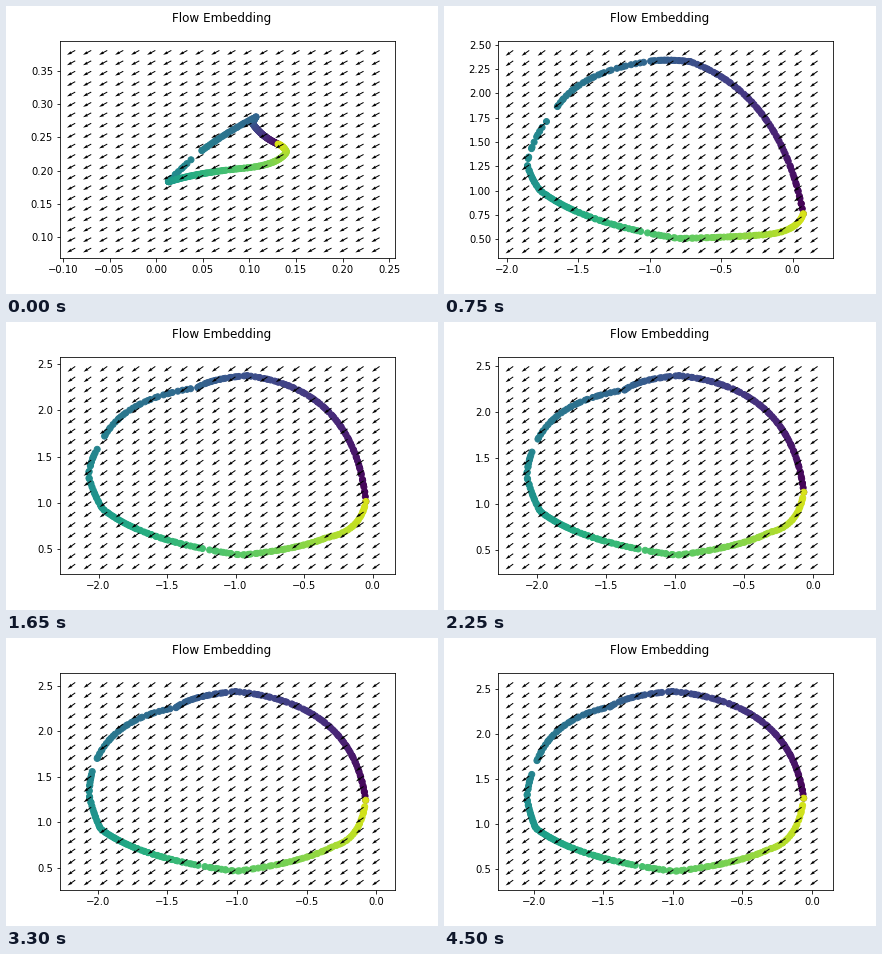
These frames come from a looping animation (432 px wide and 288 px high, 4.65 s). A matplotlib script:

```python
import numpy as np
import matplotlib.pyplot as plt
from matplotlib.animation import FuncAnimation

TICKS, STEP = 31, 150
GRID, PAD = 20, 0.1

# Share of the loop at each landmark: start, top, kink, gap, left, corner,
# bottom, right foot and back to the start
MARKS = np.array([0, .26, .345, .47, .515, .57, .79, .92, 1])
GAPS = [(.325, .333), (.462, .478), (.744, .752)]

# How far each side bends towards the corner of its bounding box
FOLDED = [-.3, 0, -.1, 0, 0, .3, -.6, .4]
OPENING = [.25, .4, -.5, -.3, .4, .3, 0, -.5]
ROUND = [.8, -.5, -.62, -.4, .2, .42, -.35, -.7]

# Training step: bends and landmarks in data units
POSES = {
    0: (FOLDED, [(.1308, .240), (.103, .272), (.1072, .281), (.0428, .2235),
                 (.0131, .1843), (.0138, .1833), (.0965, .204),
                 (.1399, .228)]),
    2: (OPENING, [(.218, .635), (-.538, 2.302), (-.763, 2.448),
                  (-1.288, 1.979), (-1.533, 1.281), (-1.462, 1.062),
                  (-.635, .646), (.115, .59)]),
    6: (ROUND, [(-.018, .844), (-.835, 2.342), (-1.147, 2.253),
                (-1.941, 1.64), (-2.077, 1.274), (-1.964, .952),
                (-.909, .416), (-.36, .522)]),
    18: (ROUND, [(-.085, 1.221), (-1.016, 2.417), (-1.433, 2.238),
                 (-2.047, 1.593), (-2.071, 1.32), (-1.978, .915),
                 (-1.016, .457), (-.298, .751)]),
    29: (ROUND, [(-.06, 1.289), (-1.007, 2.473), (-1.453, 2.30),
                 (-2.003, 1.589), (-2.05, 1.289), (-1.986, .956),
                 (-.993, .477), (-.309, .722)]),
}


def sample_positions(n=270):
    rng = np.random.default_rng(4)
    t = (np.arange(n) + rng.uniform(0, 1, n)) / n
    t[0], t[-1] = 0, 1
    for a, b in GAPS:
        t = t[(t <= a) | (t >= b)]
    return t


def outline(bends, points, t):
    """Closed loop of quadratic Bezier sides, evaluated at t."""
    a = np.array(points)
    b = np.roll(a, -1, axis=0)
    mid = (a + b) / 2
    corner = np.column_stack([a[:, 0], b[:, 1]])
    c = mid + np.array(bends)[:, None] * (corner - mid)
    i = np.clip(np.searchsorted(MARKS, t, side="right") - 1, 0, len(a) - 1)
    s = ((t - MARKS[i]) / (MARKS[i + 1] - MARKS[i]))[:, None]
    return (1 - s)**2 * a[i] + 2 * s * (1 - s) * c[i] + s**2 * b[i]


T = sample_positions()
TIMES = np.log1p(list(POSES))
CURVES = [outline(bends, points, T) for bends, points in POSES.values()]


def pose(step):
    """Blend neighbouring poses; progress slows down like a training run."""
    time = np.log1p(step)
    i = min(np.searchsorted(TIMES, time, side="right") - 1, len(TIMES) - 2)
    w = (time - TIMES[i]) / (TIMES[i + 1] - TIMES[i])
    return (1 - w) * CURVES[i] + w * CURVES[i + 1]


fig, ax = plt.subplots(figsize=(6, 4), dpi=72)
fig.subplots_adjust(left=.125, right=.9, bottom=.125, top=.88)
fig.suptitle("Flow Embedding")


def draw(tick):
    step = max(0, tick - 1)  # the first pose is held for two ticks
    pts = pose(step)
    lo, hi = pts.min(axis=0) - PAD, pts.max(axis=0) + PAD
    gx, gy = np.meshgrid(np.linspace(lo[0], hi[0], GRID),
                         np.linspace(lo[1], hi[1], GRID))
    angle = np.radians(208 + 7 * min(1, step / 2))
    flow = np.ones_like(gx)

    ax.clear()
    ax.scatter(pts[:, 0], pts[:, 1], c=.94 * T, cmap="viridis", vmin=0, vmax=1)
    ax.quiver(gx, gy, np.cos(angle) * flow, np.sin(angle) * flow)
    margin = .05 * (hi - lo)
    ax.set_xlim(lo[0] - margin[0], hi[0] + margin[0])
    ax.set_ylim(lo[1] - margin[1], hi[1] + margin[1])
    return []


anim = FuncAnimation(fig, draw, frames=TICKS, interval=STEP,
                     init_func=lambda: draw(0), repeat=True, repeat_delay=0)
plt.show()
```
